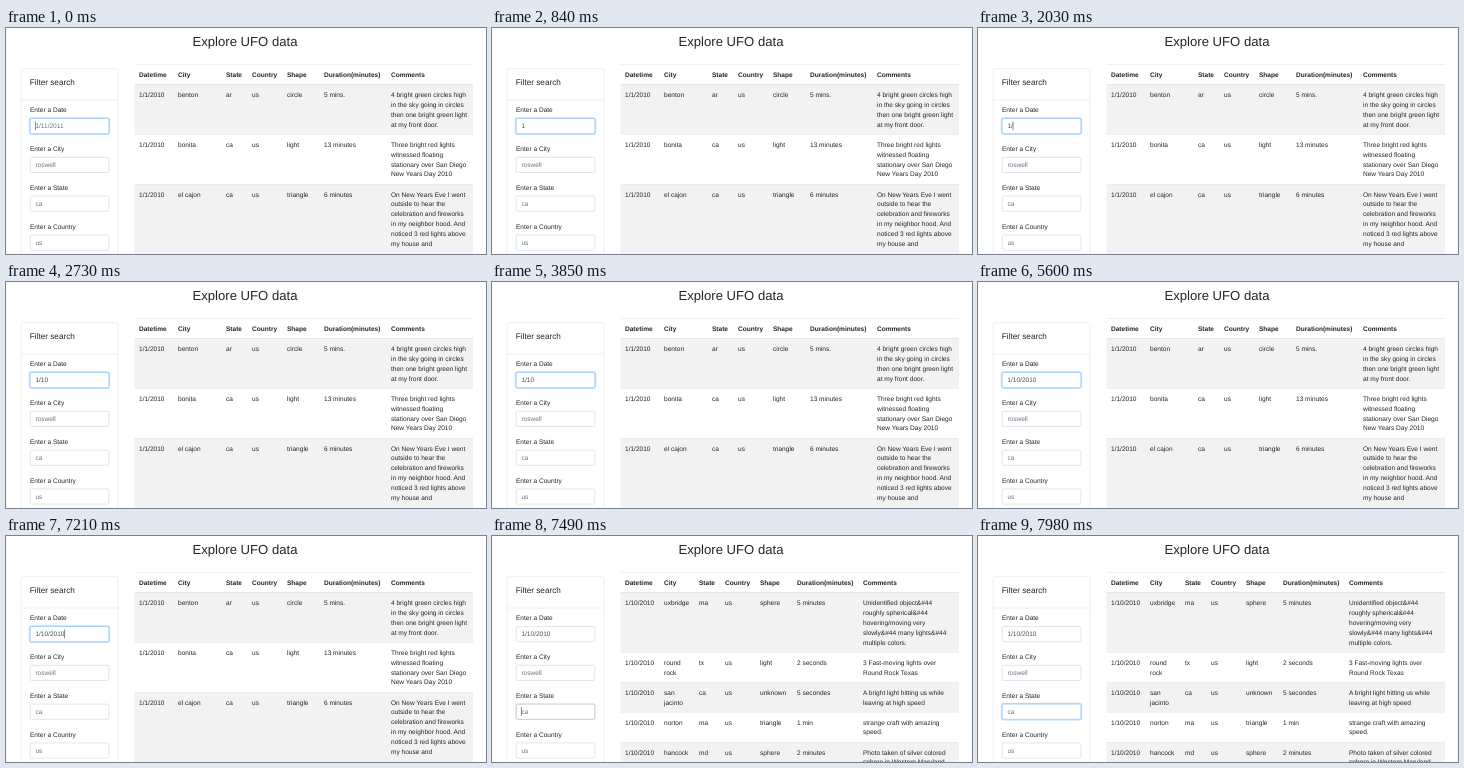
Write an HTML page that moves like this. It is 480x226 px and loops after 8 s.

```html
<!DOCTYPE html>
<html lang="en">
<head>
<meta charset="utf-8">
<title>Explore UFO data</title>
<style>
  html, body { margin: 0; width: 100%; height: 100%; overflow: hidden; background: #fff; }
  svg { display: block; width: 480px; height: 226px; }
  text { font: 6.56px "Liberation Sans", Arial, sans-serif; fill: #212529; text-rendering: geometricPrecision; }
  .title { font-size: 13.12px; text-anchor: middle; }
  .heading { font-size: 8.2px; }
  .head { font-weight: bold; }
  .value { fill: #495057; }
  .placeholder { fill: #6c757d; }
  .card { fill: none; stroke: #dfdfdf; stroke-width: .5; }
  .box { fill: #fff; stroke: #ced4da; stroke-width: .6; }
  .ring { fill: none; stroke: #007bff; stroke-width: 1.3; }
  .rule { fill: #dee2e6; }
  .stripe { fill: #f2f2f2; }
  .caret { fill: #343a40; }
</style>
</head>
<body>
<svg id="stage" viewBox="0 0 480 226"></svg>
<script>
const LOOP = 8000, SUBMIT = 7490, SETTLED = 7560;
const LINE = 9.84, LEFT = 128.5, WIDTH = 338.5, FIELD_PITCH = 38.8;

const HEADERS = ['Datetime', 'City', 'State', 'Country', 'Shape', 'Duration(minutes)', 'Comments'];

// Each row: city, state, country, shape, duration, comments; "|" breaks a line.
const ALL = {
  date: '1/1/2010',
  columns: [133, 172, 220, 246, 281, 318, 385],
  rows: [
    ['benton', 'ar', 'us', 'circle', '5 mins.',
      '4 bright green circles high|in the sky going in circles|then one bright green light|at my front door.'],
    ['bonita', 'ca', 'us', 'light', '13 minutes',
      'Three bright red lights|witnessed floating|stationary over San Diego|New Years Day 2010'],
    ['el cajon', 'ca', 'us', 'triangle', '6 minutes',
      'On New Years Eve I went|outside to hear the|celebration and fireworks|in my neighbor hood. And|noticed 3 red lights above|my house and|']
  ]
};
const FILTERED = {
  date: '1/10/2010',
  columns: [133, 172, 207, 233, 268, 305, 371],
  rows: [
    ['uxbridge', 'ma', 'us', 'sphere', '5 minutes',
      'Unidentified object&#44|roughly spherical&#44|hovering/moving very|slowly&#44 many lights&#44|multiple colors.'],
    ['round|rock', 'tx', 'us', 'light', '2 seconds', '3 Fast-moving lights over|Round Rock Texas'],
    ['san|jacinto', 'ca', 'us', 'unknown', '5 secondes', 'A bright light hitting us while|leaving at high speed'],
    ['norton', 'ma', 'us', 'triangle', '1 min', 'strange craft with amazing|speed.'],
    ['hancock', 'md', 'us', 'sphere', '2 minutes', 'Photo taken of silver colored|sphere in Western Maryland']
  ]
};

const FIELDS = [['Date', '1/11/2011'], ['City', 'roswell'], ['State', 'ca'], ['Country', 'us']];

// Times at which each further character of the date appears.
const TYPED = '1/10/2010';
const KEYS = [280, 980, 2100, 2240, 3990, 4760, 4830, 5040, 5110];
// The caret starts visible and flips at each of these times.
const BLINKS = [210, 280, 840, 980, 1470, 2030, 2730, 3290, 3850, 3990, 4550, 4760, 5600, 6160, 6650, 7210, 7980];

const escape = s => s.replace(/&/g, '&amp;');
const text = (x, y, s, type = '') => `<text class="${type}" x="${x}" y="${y}">${escape(s)}</text>`;
const rect = (x, y, w, h, type, extra = '') =>
  `<rect class="${type}" x="${x}" y="${y}" width="${w}" height="${h}" ${extra}/>`;

function table(id, { date, columns, rows }) {
  let out = rect(LEFT, 36.2, WIDTH, .5, 'rule');
  HEADERS.forEach((name, i) => out += text(columns[i], 48.8, name, 'head'));
  let top = 56.8;
  rows.forEach((row, r) => {
    const cells = [date, ...row].map(cell => cell.split('|'));
    const height = Math.max(...cells.map(c => c.length)) * LINE + 10.25;
    if (r % 2 === 0) out += rect(LEFT, top, WIDTH, height, 'stripe');
    out += rect(LEFT, top - (r ? 0 : .6), WIDTH, r ? .45 : .85, 'rule');
    cells.forEach((lines, c) => lines.forEach((line, n) =>
      out += text(columns[c], top + 12.5 + n * LINE, line)));
    top += height;
  });
  return `<g id="${id}">${out}</g>`;
}

function field([name, hint], i) {
  const y = i * FIELD_PITCH;
  return text(24, 84.3 + y, 'Enter a ' + name) +
    rect(23.5, 89.8 + y, 80, 16.5, 'ring', `rx="2.2" id="ring${i}"`) +
    rect(24.2, 90.5 + y, 78.6, 15.2, 'box', `rx="1.5" id="box${i}"`) +
    `<g id="value${i}">${text(29.4, 100.4 + y, hint, 'placeholder')}</g>`;
}

const stage = document.getElementById('stage');
stage.innerHTML =
  text(239, 18.2, 'Explore UFO data', 'title') +
  '<path class="card" d="M15.2 230V42.3q0-1.6 1.6-1.6H110.3q1.6 0 1.6 1.6V230M15.2 72H111.9"/>' +
  text(23.8, 56.9, 'Filter search', 'heading') +
  FIELDS.map(field).join('') +
  table('all', ALL) + table('filtered', FILTERED) +
  rect(0, 0, .6, 8.6, 'caret', 'id="caret"');

const $ = id => document.getElementById(id);
const show = (node, on) => node.setAttribute('visibility', on ? 'visible' : 'hidden');
const dateText = $('value0').firstChild;

function draw(t) {
  const submitted = t >= SUBMIT;
  const settled = !submitted || t >= SETTLED;
  const active = submitted ? 2 : 0;
  show($('all'), !submitted);
  show($('filtered'), submitted);

  const typed = TYPED.slice(0, KEYS.filter(k => t >= k).length);
  dateText.textContent = typed || FIELDS[0][1];
  dateText.setAttribute('class', typed ? 'value' : 'placeholder');

  FIELDS.forEach((_, i) => {
    const focused = i === active;
    $('ring' + i).setAttribute('opacity', focused ? (settled ? .25 : .04) : 0);
    $('box' + i).style.stroke = focused ? (settled ? '#80bdff' : '#a4a8ad') : '';
  });

  const typedWidth = typed && !submitted ? dateText.getComputedTextLength() : 0;
  $('caret').setAttribute('x', 29.3 + typedWidth);
  $('caret').setAttribute('y', 93.6 + active * FIELD_PITCH);
  show($('caret'), BLINKS.filter(b => t >= b).length % 2 === 0);
}

const start = performance.now();
function tick() {
  draw((performance.now() - start) % LOOP);
  requestAnimationFrame(tick);
}
tick();
</script>
</body>
</html>
```
